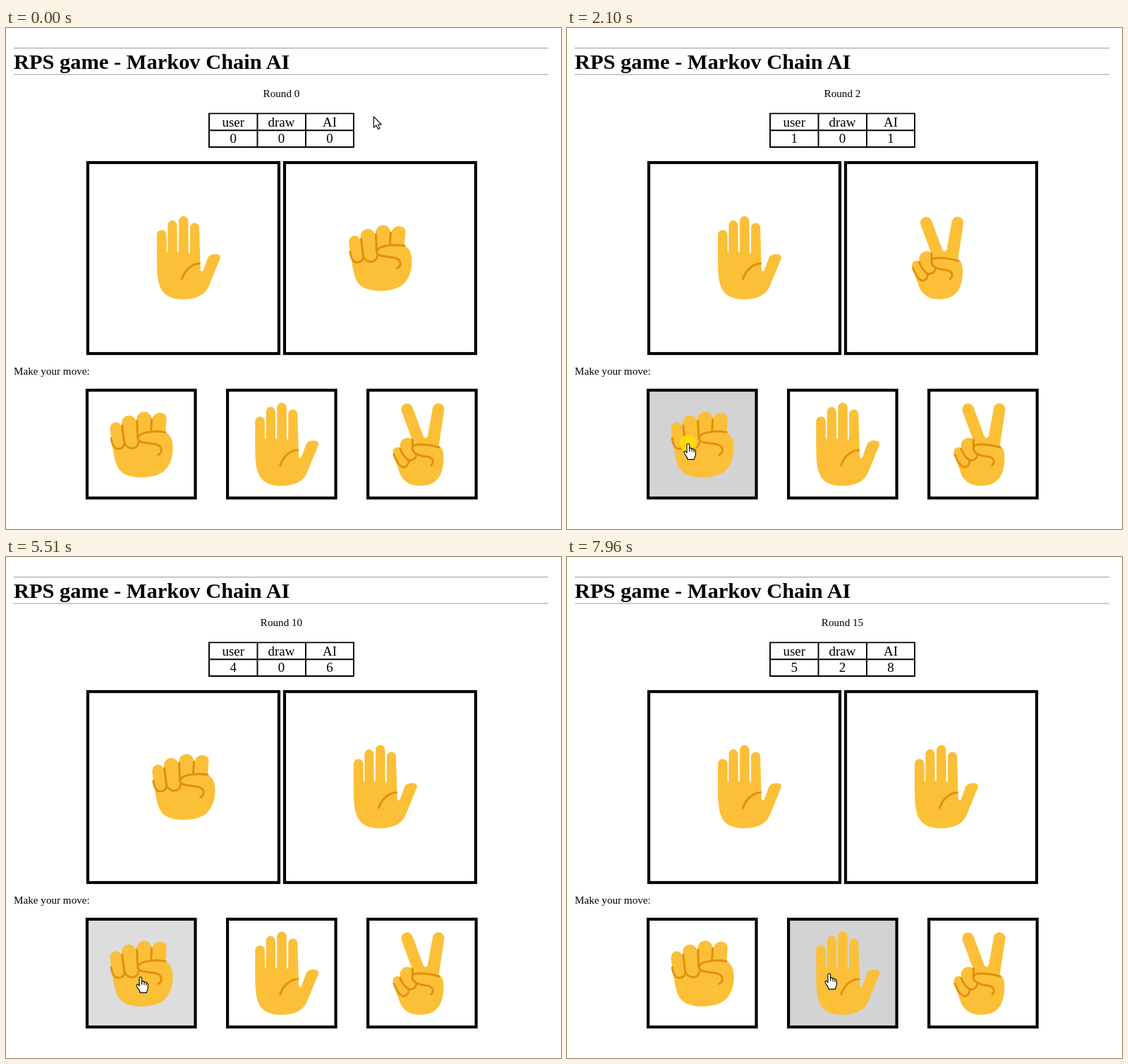
These frames come from a looping animation (787 by 711 pixels, 8 s). An HTML page:

```html
<!DOCTYPE html>
<html lang="en">
<head>
<meta charset="utf-8">
<title>RPS game</title>
<style>
  html, body { margin: 0; width: 100%; height: 100%; overflow: hidden; background: #fff; }
  svg { display: block; width: 787px; height: 711px; font-family: "Liberation Serif", "Times New Roman", serif; }
  .title { font-size: 30.45px; font-weight: bold; }
  .body { font-size: 15.17px; }
  .table text { font-size: 18.96px; }
  .mid { text-anchor: middle; }
  .box { fill: #fff; stroke: #000; stroke-width: 4.2; }
  .skin { fill: #fbc037; }
  .crease { fill: none; stroke: #e48f0e; stroke-width: 3; stroke-linecap: round; stroke-linejoin: round; }
  .cursor { fill: #fff; stroke: #000; stroke-width: 1.1; stroke-linejoin: round; }
</style>
</head>
<body>
<svg viewBox="0 0 787 711">
  <defs>
    <g id="R">
      <path class="skin" d="M-44-20C-46-33-31-36-28-25L-27.5-30C-28-44-9-45-7-32L-6.5-36C-5-50 13-50 15-37L16.5-37C18-48 36-48 36-37C35.5-30 35-24 34.5-17.5C42-14 45-6 45 4C45 18 41 29 33 37C24 45 10 46.5-1 46.5C-20 46.5-31 40-35 28C-39 18-41 0-44-20Z"/>
      <path class="crease" d="M-42.5-9C-41.5 0-38 6-33 6C-27 6-23 2-24-3L-27-27M-24-3C-20 8-5 8-4-3M-6-34L-5-9M15-36L14-19M34.5-17.5C20-20-4-18-4.5-9C-5-1 12-3 22 0C31 3 30 12 24 14.5"/>
    </g>
    <g id="P">
      <path class="skin" d="M-37.5-33C-37.5-42-24-42-24-33L-23.7-9Q-23-6.5-22.2-9L-22-46C-22-56-9.5-56-9-46L-8.7-9Q-7.7-7-6.7-9L-6.5-52C-6.5-62 7-62 7-52L7.2-8Q8.3-6 9.4-8L9.5-43C9.5-52 22.5-52 22.5-43L24.3 16Q25 21 28 18L35-1C37-5 43-6 47-5.5C52-5 53-2 52 1L36 40C31 52 18 58.5 0 58.5C-20 58.5-30 51-34 38C-38 25-37.5 10-37.5-33Z"/>
      <path class="crease" d="M-2 29.5C2 17 12 8 23 7.7"/>
    </g>
    <g id="S">
      <path class="skin" d="M-29.1-47.7A8.3 8.3 0 0 1-13.5-53.3L1.8-12Q4.8-6.5 8-12L15.2-52A8.3 8.3 0 0 1 31.6-49.6L24 1C30 6 31 13 30.5 21C30 45 20 58.5-3 58.5C-22 58.5-30 47-33 36C-36 28-39 20-41 14C-43 4-35 2-31 5C-33-5-25-13-14.5-8Z"/>
      <path class="crease" d="M-40 14C-36 24-31 33-25 32C-21 31-19 27-19 23M-31 6C-27 16-20 25-14 22Q-9 20-8 15M-13.5-7L-13.5 4M24 4C10 0-12-3-13.5 4C-15 12-5 15 3 16.5C16 17 18 24 13 29.5"/>
    </g>
  </defs>

  <path d="M11 28.5H769M11 66H769" stroke="#9a9a9a"/>
  <text class="title" x="11" y="58">RPS game - Markov Chain AI</text>
  <text class="body mid" id="round" x="390.5" y="98"></text>
  <g class="table mid">
    <path d="M287 121.4H494M287 145.3H494M287 169H494M288 121V170M356.5 121V170M425 121V170M493 121V170" stroke="#000" stroke-width="1.9"/>
    <text x="322.3" y="139.5">user</text>
    <text x="390.5" y="139.5">draw</text>
    <text x="459" y="139.5">AI</text>
    <text class="score" x="322.3" y="163.3"></text>
    <text class="score" x="390.5" y="163.3"></text>
    <text class="score" x="459" y="163.3"></text>
  </g>

  <rect class="box" x="116" y="191" width="271" height="271"/>
  <rect class="box" x="395" y="191" width="271" height="271"/>
  <use id="userHand" x="251.5" y="326.5"/>
  <use id="aiHand" x="530.5" y="326.5"/>

  <text class="body" x="11" y="491.5">Make your move:</text>
  <g id="moves"></g>

  <g id="pointer">
    <circle id="click" cy="-.5" r="12" fill="#ffe10a" fill-opacity=".82"/>
    <path class="cursor" id="arrow" d="M.5.8V16.3L4 13L6.5 18.6L9 17.5L6.6 12H11.3Z"/>
    <g id="finger">
      <path class="cursor" d="M-2 1.5C-2-.6 1.6-.6 1.6 1.5V7C2.2 5.6 5 5.8 5 7.8C5.6 6.6 8 7 8 8.8C8.8 8 10.4 8.6 10.4 10.4V15C10.4 18 8.6 19 8.4 22.4H-.8C-.8 19.6-3.4 17.6-5.6 13.4C-7 10.8-4.6 9.6-3 11.6L-2 12.8Z"/>
      <path class="cursor" d="M1.6 7V11M5 8V11.4M8 9V12"/>
    </g>
  </g>
</svg>
<script>
const LOOP = 8000, TICK = 78, PRESS = 80;
const BEATS = { R: 'S', P: 'R', S: 'P' };
const START = { x: 521, y: 125 };

// each round: when it is scored, user and AI move, and where the pointer goes if it moves
const rounds = [
  { at: 850, play: 'RS', to: [186, 598] },
  { at: 1480, play: 'PS', to: [385, 598] },
  { at: 2176, play: 'RS', to: [172, 590] },
  { at: 2640, play: 'RP', to: [191, 596] },
  { at: 3040, play: 'RS' },
  { at: 3500, play: 'RP' },
  { at: 4030, play: 'RS' },
  { at: 4430, play: 'RP' },
  { at: 4970, play: 'RP' },
  { at: 5510, play: 'RP' },
  { at: 6300, play: 'PS', to: [368, 596] },
  { at: 6690, play: 'SP', to: [548, 596] },
  { at: 7080, play: 'PP', to: [450, 592] },
  { at: 7560, play: 'RP', to: [240, 596] },
  { at: 7960, play: 'PP', to: [372, 591] }
];

const get = id => document.getElementById(id);
const scores = document.querySelectorAll('.score');
const show = (el, on) => el.setAttribute('visibility', on ? 'visible' : 'hidden');

const buttonX = i => 115 + 199.1 * i;
get('moves').innerHTML = [...'RPS'].map((m, i) =>
  `<rect class="box" x="${buttonX(i)}" y="514" width="153.5" height="153"/>
   <use href="#${m}" x="${buttonX(i) + 76.7}" y="591.2"/>`).join('');
const buttons = document.querySelectorAll('#moves rect');

// the pointer reaches its spot one press before the score; longer trips take longer
let last = START, free = 0;
const trips = rounds.map(({ at, to }) => {
  const [x, y] = to || [last.x, last.y];
  const end = at - PRESS;
  const length = 280 + 0.72 * Math.hypot(x - last.x, y - last.y);
  const trip = { from: last, x, y, start: Math.max(free, end - length), end };
  last = trip;
  free = at + PRESS;
  return trip;
});

function pointerAt(t) {
  const trip = trips.filter(p => p.start <= t).pop();
  if (!trip) return START;
  const { from, x, y, start, end } = trip;
  const moved = Math.floor((t - start) / TICK) * TICK;
  const k = t >= end ? 1 : moved / (end - start);
  const e = k * k * (3 - 2 * k);
  return { x: from.x + (x - from.x) * e, y: from.y + (y - from.y) * e };
}

function outcome([user, ai]) {
  return user === ai ? 1 : BEATS[user] === ai ? 0 : 2;
}

function draw(t) {
  const played = rounds.filter(r => r.at <= t);
  const tally = [0, 0, 0];
  played.forEach(r => tally[outcome(r.play)]++);
  const [before, now] = [{ play: '' }, { at: 0, play: 'PR' }, ...played].slice(-2);

  get('round').textContent = 'Round ' + played.length;
  scores.forEach((el, i) => el.textContent = tally[i]);
  get('userHand').setAttribute('href', '#' + now.play[0]);
  get('aiHand').setAttribute('href', '#' + now.play[1]);

  const { x, y } = pointerAt(t);
  // a repeated round briefly lightens the hovered button
  const shade = before.play === now.play && t - now.at < 2 * TICK ? '#ddd' : '#d3d3d3';
  let over = false;
  buttons.forEach((el, i) => {
    const hit = Math.abs(x - buttonX(i) - 77) < 78 && Math.abs(y - 590.5) < 78;
    el.style.fill = hit ? shade : '#fff';
    over = over || hit;
  });

  get('pointer').setAttribute('transform', `translate(${x.toFixed(1)} ${y.toFixed(1)})`);
  show(get('arrow'), !over);
  show(get('finger'), over);
  show(get('click'), rounds.some(r => t < r.at && t >= r.at - PRESS));
}

const begin = performance.now();
function frame() {
  draw((performance.now() - begin) % LOOP);
  requestAnimationFrame(frame);
}
frame();
</script>
</body>
</html>
```
